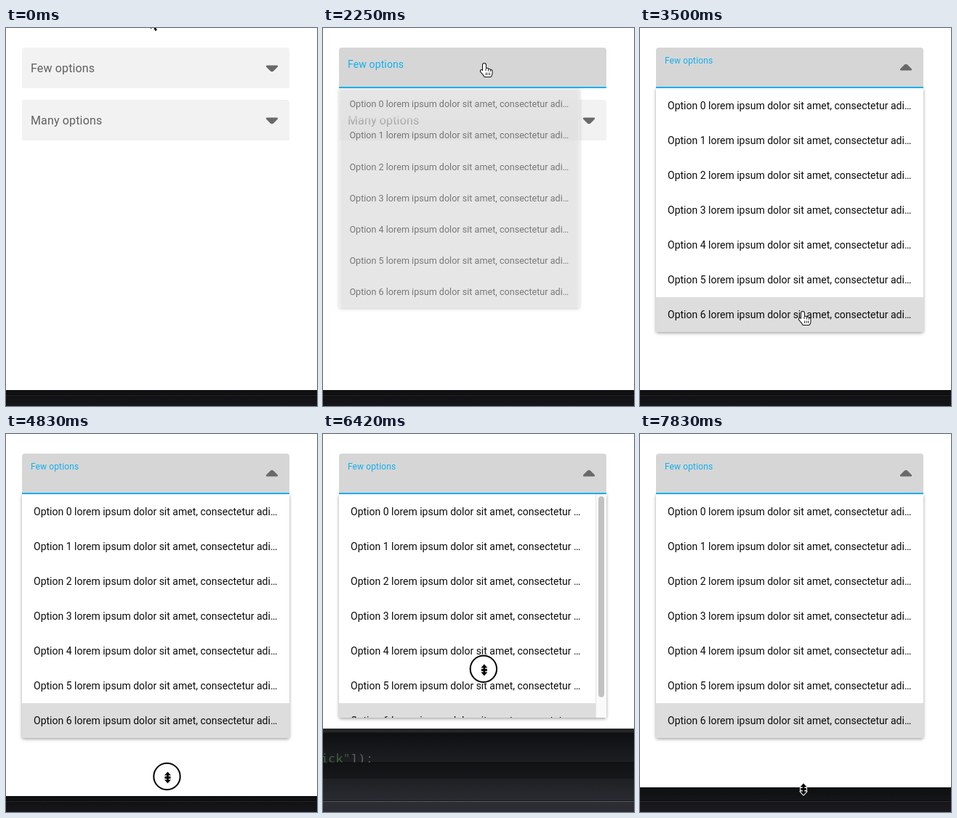
Write an HTML page with a canvas that moves like this. It is 428 by 521 pixels and loops after 8 s.

```html
<!DOCTYPE html>
<html lang="en">
<head>
<meta charset="utf-8">
<title>Select menu resize</title>
<style>
html, body { margin: 0; width: 100%; height: 100%; overflow: hidden; background: #fff; }
canvas { display: block; width: 428px; height: 521px; }
</style>
</head>
<body>
<canvas id="stage"></canvas>
<script>
const W = 428, H = 521, LOOP = 8000, TICK = 1000 / 12;
const LEFT = 22, RIGHT = 390, MENU_TOP = 83, ROW = 48, ROWS = 7;
const CYAN = '#12b0ee';
const canvas = document.getElementById('stage');
const ctx = canvas.getContext('2d');
const dpr = window.devicePixelRatio || 1;
canvas.width = W * dpr;
canvas.height = H * dpr;

// Tracks: [tick, value, ...]
const POINTER = [[0, 199, -14], [14, 199, -14], [15, 199.5, -12], [18, 206, 8], [24, 222, 50],
  [29, 222, 50], [34, 235, 145], [35, 235, 147], [38, 233, 225], [42, 224, 392], [45, 219, 473], [48, 221, 494]];
const GRIP = [[48, 221.5, 500], [55, 221.5, 500], [58, 221.5, 472], [65, 221, 407], [67, 220.5, 381.5],
  [72, 220.5, 305], [76, 220.5, 305], [80, 222, 380], [84, 224, 474.5], [86, 224, 487], [87, 224, 488]];
const PAGE = [[58, 499], [65, 437], [67, 407], [68, 406], [86, 406], [87, 455], [88, 478], [89, 487]];
const WINDOW = [[58, 499], [65, 452], [67, 433], [72, 406], [76, 406], [84, 448], [86, 470], [89, 487]];

const ARROW = new Path2D('M0 0V15.5L3.6 12.2L6.2 18L8.8 16.9L6.3 11.2H11.2Z');
const HAND = new Path2D('M-2 1Q-2-1 0-1Q2-1 2 1V6Q5 5 5.5 7Q8 6.2 8.3 8Q10.5 7.5 10.5 9.5V13' +
  'Q10 15.5 8.8 17H.5Q-1 14-5 10Q-5.5 7.6-3.5 8L-2 9.5Z');
const FINGERS = new Path2D('M2 6V9M5.5 7V9.5M8.3 8V10M2.5 11.5V15M5 11.5V15M7.5 11.5V15');
const RESIZE = new Path2D('M0-8L4.5-3H1.3V-1.5H4V1.5H1.3V3H4.5L0 8L-4.5 3H-1.3V1.5H-4V-1.5H-1.3V-3H-4.5Z');
const DROP = new Path2D('M-7-4.5H7Q9-4 7.5-2L2 3.4Q0 5-2 3.4L-7.5-2Q-9-4-7-4.5Z');

const clamp = v => Math.min(1, Math.max(0, v));
const mix = (a, b, p) => a + (b - a) * p;

function sample(track, k) {
  const i = track.findIndex(key => key[0] > k);
  if (i < 0) return track[track.length - 1].slice(1);
  if (i === 0) return track[0].slice(1);
  const a = track[i - 1], b = track[i], p = (k - a[0]) / (b[0] - a[0]);
  return a.slice(1).map((v, j) => mix(v, b[j + 1], p));
}

function rect(color, x, y, w, h) {
  ctx.fillStyle = color;
  ctx.fillRect(x, y, w, h);
}

function round(color, x, y, w, h, r) {
  ctx.fillStyle = color;
  ctx.beginPath();
  ctx.roundRect(x, y, w, h, r);
  ctx.fill();
}

function text(str, x, y, size, color, spacing = 0, family = 'Roboto, sans-serif') {
  ctx.font = `${size}px ${family}`;
  ctx.letterSpacing = spacing + 'px';
  ctx.fillStyle = color;
  ctx.fillText(str, x, y);
}

function clipped(x, y, w, h, draw) {
  ctx.save();
  ctx.beginPath();
  ctx.rect(x, y, w, h);
  ctx.clip();
  draw();
  ctx.restore();
}

function shape(path, x, y, fill, edge, width) {
  ctx.save();
  ctx.translate(x, y);
  ctx.lineJoin = 'round';
  if (edge) {
    ctx.strokeStyle = edge;
    ctx.lineWidth = width;
    ctx.stroke(path);
  }
  ctx.fillStyle = fill;
  ctx.fill(path);
  ctx.restore();
}

function shade(from, top, bottom) {
  const g = ctx.createLinearGradient(0, from, 0, from + 80);
  g.addColorStop(0, 'rgba(0,0,0,.67)');
  g.addColorStop(1, 'rgba(0,0,0,0)');
  rect(g, 0, top, W, bottom - top);
}

function editor(k, edge) {
  const lagging = k >= 66 && k < 78;
  rect('#2a2d32', 0, 400, W, 105);
  rect('#19191c', 0, 505, W, 1.5);
  rect('#2c2c34', 0, 506.5, W, H - 506);
  clipped(0, 400, W, 53, () => {
    const mono = '"Roboto Mono", "Noto Sans Mono", monospace';
    text('ick"', -3, 453, 17, '#6f9560', 0, mono);
    text(']);', 38, 453, 17, '#9a9da4', 0, mono);
  });
  if (lagging) {
    shade(edge, edge, 452);
    shade(430, 452, H);
    rect('rgba(0,0,0,.25)', 0, 452, W, 22);
    rect('#17181b', 0, 474, W, 1);
  } else {
    shade(edge, edge, H);
  }
}

function field(label, y, color, open) {
  round(color, LEFT, y, RIGHT - LEFT, 56, [4, 4, 0, 0]);
  const size = mix(16, 12, open);
  text(label, 34, y + mix(34, 22, open), size, open > 0 ? CYAN : '#606060', size * 0.009375);
  ctx.save();
  ctx.translate(366, y + mix(29, 27, open));
  ctx.scale(1, 1 - 2 * open);
  shape(DROP, 0, 0, '#696969');
  ctx.restore();
  if (open > 0) {
    const half = (RIGHT - LEFT) / 2 * open;
    rect(CYAN, 206 - half, y + 54, half * 2, 2);
  }
}

function rowColor(i, k, pointerY) {
  if (i === 0 && k < 35) return '#e5e5e5';
  if (i === 6 && k >= 42) return '#dddddd';
  const over = Math.floor((pointerY - MENU_TOP) / ROW);
  return i === over && i > 1 && k < 44 ? '#f3f3f3' : null;
}

function menu(k, page, pointerY) {
  const p = clamp((k - 26) / 2);
  if (p <= 0) return;
  const full = ROW * ROWS, height = Math.min(full, page - 15 - MENU_TOP);
  const scrolls = height < full, width = RIGHT - LEFT;
  ctx.save();
  ctx.globalAlpha = p;
  ctx.translate(LEFT, MENU_TOP);
  ctx.scale(mix(0.8, 1, p), mix(0.8, 1, p));
  ctx.save();
  ctx.shadowColor = 'rgba(0,0,0,.38)';
  ctx.shadowBlur = 4 * dpr;
  ctx.shadowOffsetY = 1.5 * dpr;
  round('#fff', 0, 0, width, height, [0, 0, 3, 3]);
  ctx.restore();
  clipped(0, 0, width, height, () => {
    for (let i = 0; i < ROWS; i++) {
      const color = rowColor(i, k, pointerY);
      if (color) rect(color, 0, i * ROW, width, ROW);
      const end = scrolls ? '…' : 'adi…';
      text(`Option ${i} lorem ipsum dolor sit amet, consectetur ${end}`, 16, i * ROW + 29, 14, '#0c0c0c');
    }
    if (scrolls) {
      rect('#fafafa', 353, 0, 15, height);
      rect('#e5e5e5', 353, 0, 1, height);
      round('#c1c1c1', 357, 3, 8, (height - 4) * height / full - 2, 4);
    }
  });
  ctx.restore();
  rect(CYAN, LEFT, MENU_TOP - 2, width, 2);
}

function ring(x, y) {
  for (const [color, width] of [['#fff', 4], ['#000', 2]]) {
    ctx.strokeStyle = color;
    ctx.lineWidth = width;
    ctx.beginPath();
    ctx.arc(x, y, 18.2, 0, Math.PI * 2);
    ctx.stroke();
  }
}

function cursor(k, x, y) {
  if (k >= 48) {
    const [gx, gy] = sample(GRIP, k);
    if (k >= 53 && k < 94) ring(gx, gy);
    shape(RESIZE, gx + 1, gy + 1.5, '#000', '#fff', 2);
  } else if (y > 27 && y < 419) {
    shape(HAND, x, y, '#fff', '#111', 2);
    ctx.save();
    ctx.translate(x, y);
    ctx.strokeStyle = '#111';
    ctx.lineWidth = 0.9;
    ctx.stroke(FINGERS);
    ctx.restore();
  } else {
    shape(ARROW, x, y, '#000', '#fff', 2);
  }
}

function draw(k) {
  const [x, y] = sample(POINTER, k);
  const [page] = sample(PAGE, k), [edge] = sample(WINDOW, k);
  ctx.setTransform(dpr, 0, 0, dpr, 0, 0);
  rect('#fff', 0, 0, W, H);
  editor(k, Math.max(page, edge));
  if (edge > page) {
    rect('#262626', 0, page, W, edge - page);
    if (k > 77) rect('#4c4c4c', 0, edge, W, 1);
  }
  rect('#fff', 0, 0, W, page);
  const open = clamp((k - 26) / 2);
  const tone = k >= 27 ? '#d6d6d6' : k >= 26 ? '#e2e2e2' : y > 27 ? '#ececec' : '#f2f2f2';
  field('Few options', 27, tone, open);
  field('Many options', 99, '#f2f2f2', 0);
  menu(k, page, y);
  cursor(k, x, y);
}

function frame(now) {
  draw(Math.floor((now % LOOP + 5) / TICK) % 96);
  requestAnimationFrame(frame);
}
requestAnimationFrame(frame);
</script>
</body>
</html>
```
